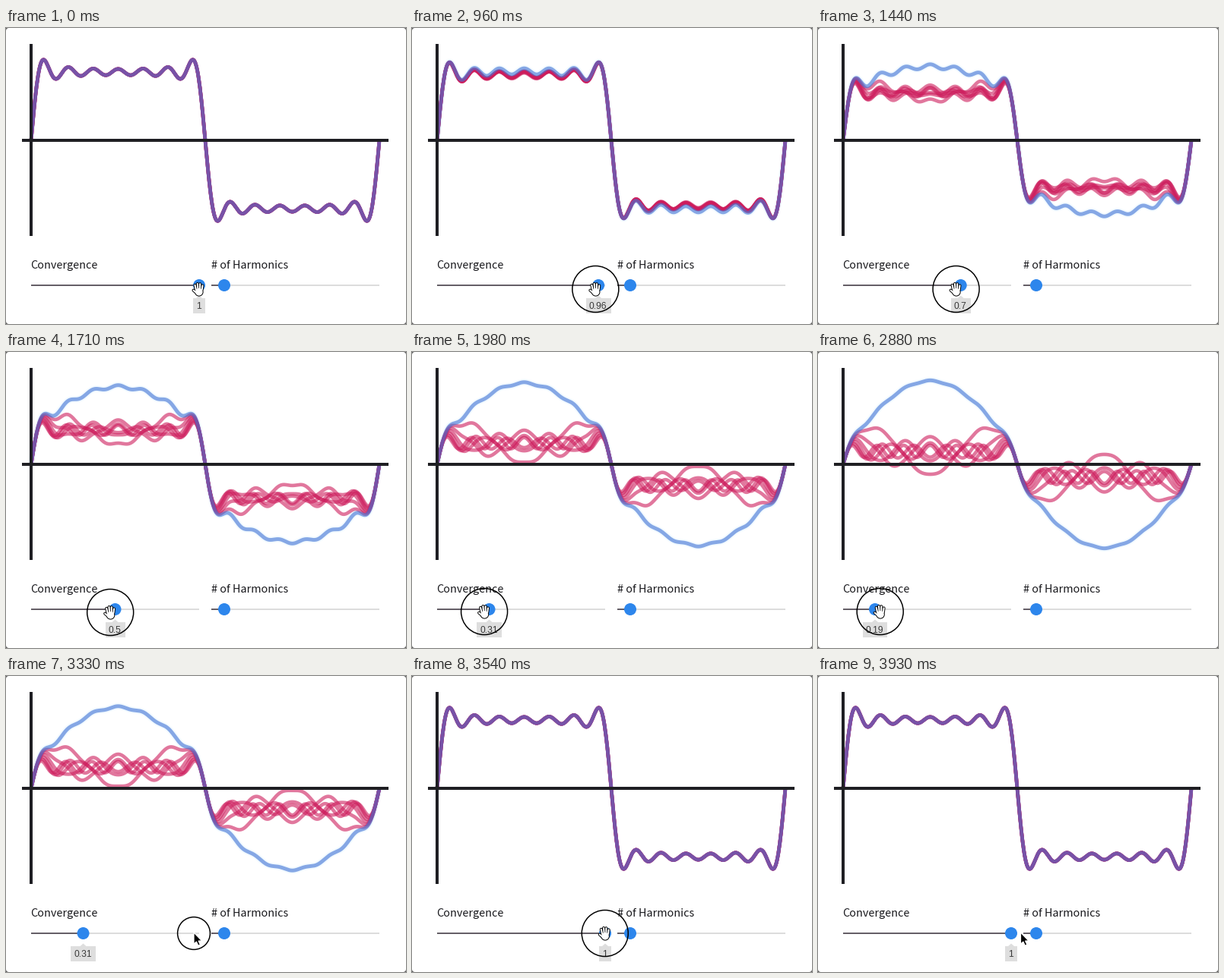
Recreate the animation shown at these times as a matplotlib script. Size 526 by 390 pixels, loop 3960 ms.

```python
import numpy as np
import matplotlib.pyplot as plt
from matplotlib.animation import FuncAnimation
from matplotlib.patches import Circle, Ellipse, FancyBboxPatch, Polygon, Rectangle

W, H, DPI = 526, 390, 100
FRAMES, STEP = 132, 30
PX = 72 / DPI

INK = "#1f1f23"
RED = (205 / 255, 28 / 255, 92 / 255)
BLUE = (66 / 255, 116 / 255, 214 / 255)
THUMB = "#2d86ec"
FILL = "#655f67"
TRACK = "#dcdcdc"
TAG = "#dedede"

X0, X1, MID_Y = 33, 491, 148
SLIDER_Y, SLIDER_W = 339, 221
AMPLITUDE = 360 / np.pi
HARMONICS = np.arange(1, 14, 2)
LAG = 35  # the page trails the pointer by this many ms
ARROW = np.array([(0, 0), (0, 15.2), (3.4, 12), (5.7, 17.2), (8.4, 16),
                  (6.1, 11), (10.6, 11)])


def ease(t, start, end):
    u = np.clip((t - start) / (end - start), 0, 1)
    return (1 - np.cos(np.pi * u)) / 2


def drag(t):
    """First drag: down to almost zero, then back up a little."""
    return 1 - .94 * ease(t, 690, 2650) + .25 * ease(t, 2700, 3060)


def convergence(t):
    clicked = .66 * (t >= 3390) + .03 * ease(t, 3420, 3560)
    return round(float(drag(t) + clicked), 2)


def pointer(t):
    x = X0 - .5 + SLIDER_W * drag(t + LAG)
    x += 146 * ease(t, 3060, 3300) + 19.5 * ease(t, 3400, 3750)
    y = 344 - 2 * ease(t, 1440, 1980) - 3 * ease(t, 3060, 3300)
    return x, y


def ring_radius(t):
    first = ease(t, 660, 780) - ease(t, 3000, 3090)
    second = ease(t, 3275, 3362) - ease(t, 3845, 3915)
    return 30.5 * (first + second)


fig = plt.figure(figsize=(W / DPI, H / DPI), dpi=DPI, facecolor="#555555")
ax = fig.add_axes([0, 0, 1, 1])
ax.set_xlim(0, W)
ax.set_ylim(H, 0)
ax.axis("off")
ax.add_patch(FancyBboxPatch((0, 0), W, H, boxstyle="round,pad=0,rounding_size=4",
                            fc="white", lw=0, zorder=0))


def stroke(xs, ys, color, width, z, cap="butt", **kw):
    return ax.plot(xs, ys, color=color, lw=width * PX, zorder=z,
                   solid_capstyle=cap, solid_joinstyle="round", **kw)[0]


def label(x, y, text, size, color, z, family, **kw):
    return ax.text(x, y, text, fontsize=size * PX, color=color, zorder=z,
                   family=family, va="baseline", **kw)


def slider(x, text, thumb_x):
    label(x - .5, 317, text, 14.4, "#1a1a1e", 5, "Noto Sans CJK JP")
    stroke([x, x + SLIDER_W], [SLIDER_Y] * 2, TRACK, 2, 5)
    fill = stroke([x, thumb_x], [SLIDER_Y] * 2, FILL, 2, 6)
    thumb = ax.add_patch(Circle((thumb_x, SLIDER_Y), 8, fc=THUMB, lw=0, zorder=7))
    return fill, thumb


# Waves
xs = np.linspace(X0, X1, 500)
phase = (xs - X0) / (X1 - X0) * 2 * np.pi
waves = np.array([AMPLITUDE * np.sin(k * phase) / k for k in HARMONICS])
total = waves.sum(axis=0)

halo = stroke(xs, total, "#d4f1ff", 8.5, 1, alpha=.3)
curves = [stroke(xs, total, BLUE, 4.9, 3, alpha=.62)]
curves += [stroke(xs, total, RED, 4.6, 2, alpha=.6) for _ in HARMONICS[1:]]

# Axes
stroke([21, 503], [MID_Y] * 2, INK, 4, 4)
stroke([X0] * 2, [21, 274], INK, 4, 4)

# Sliders and value tag
fill, thumb = slider(X0, "Convergence", X0 + SLIDER_W)
slider(270, "# of Harmonics", 287)
tag = ax.add_patch(Rectangle((0, 356), 16, 20, fc=TAG, lw=0, zorder=5))
notch = ax.add_patch(Polygon([(0, 0)] * 3, fc=TAG, lw=0, zorder=5))
value = label(0, 370.5, "1", 12, "#3a3a3a", 6, "Liberation Sans", ha="center")

# Pointer: click ring, arrow, and a hand of four fanned fingers and a thumb
ring = ax.add_patch(Circle((0, 0), 1, fc="none", ec="black", lw=1.5 * PX, zorder=8))
arrow = ax.add_patch(Polygon(ARROW, fc="black", ec="white", lw=1.2 * PX, zorder=10))

i = np.arange(4)
gap = np.full(4, np.nan)
finger_x = np.append(np.column_stack([2.6 * i - 3.6, 3.3 * i - 5, gap]), [-3, -7])
finger_y = np.append(np.column_stack([i * 0 + 1, (i - 1.4) ** 2 - 7.2, gap]), [5, 1.6])
palms = [ax.add_patch(Ellipse((0, 0), 9.6 + edge, 9.6 + edge, fc=color, lw=0, zorder=z))
         for color, edge, z in (("black", 2, 9), ("white", 0, 10))]
fingers = [stroke([], [], color, width, z, "round")
           for color, width, z in (("black", 4, 9), ("white", 2.1, 10))]


def draw_pointer(t, thumb_x):
    x, y = pointer(t)
    radius = ring_radius(t)
    ring.set_center((x, y))
    ring.set_radius(radius)
    ring.set_visible(radius > .5)

    on_thumb = abs(x - thumb_x) < 11
    arrow.set_visible(not on_thumb)
    arrow.set_xy(ARROW + (x, y - 1))
    for part in palms + fingers:
        part.set_visible(on_thumb)
    for palm in palms:
        palm.set_center((x + .3, y + 3.8))
    for line in fingers:
        line.set_data(finger_x + x, finger_y + y)


def draw_value(c, x):
    text = f"{c:.2f}".rstrip("0").rstrip(".")
    width = 9.3 + 6.7 * sum(ch.isdigit() for ch in text) + 3.3 * ("." in text)
    tag.set_x(x - width / 2)
    tag.set_width(width)
    notch.set_xy([(x - 4, 356), (x, 352.5), (x + 4, 356)])
    value.set_text(text)
    value.set_x(x - .5)


def update(frame):
    t = frame * STEP
    c = convergence(t)
    for curve, wave in zip(curves, waves):
        curve.set_ydata(MID_Y - (wave + c * (total - wave)))
    halo.set_ydata(curves[0].get_ydata())
    halo.set_visible(c < 1)

    thumb_x = X0 + SLIDER_W * c
    fill.set_xdata([X0, thumb_x])
    thumb.set_center((thumb_x, SLIDER_Y))
    draw_value(c, thumb_x)
    draw_pointer(t, thumb_x)
    return []


anim = FuncAnimation(fig, update, frames=FRAMES, interval=STEP, repeat=True,
                     repeat_delay=0, blit=False)
plt.show()
```
